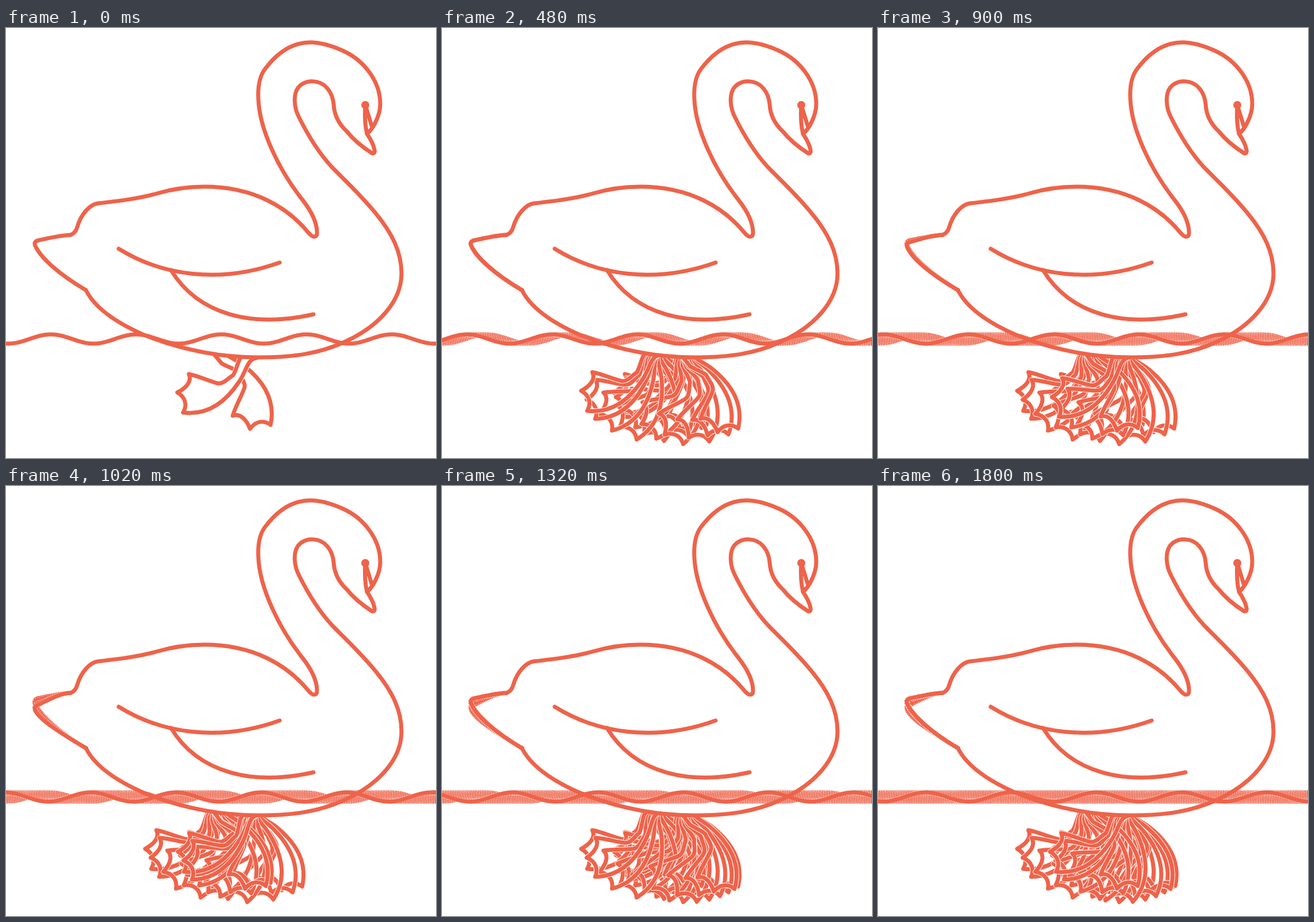
An HTML page with a canvas that plays this animation: 748x748 px, repeating every 1.86 s.

```html
<!DOCTYPE html>
<html lang="en">
<head>
<meta charset="utf-8">
<title>Swan</title>
<style>
  html, body { margin: 0; width: 100%; height: 100%; overflow: hidden; background: #fff; }
  canvas, svg { position: absolute; left: 0; top: 0; width: 748px; height: 748px; }
  .line { fill: none; stroke: #ee634a; stroke-width: 7; stroke-linecap: round; stroke-linejoin: round; }
</style>
</head>
<body>
<canvas id="trail" width="748" height="748"></canvas>
<svg viewBox="0 0 748 748">
  <g class="line">
    <path d="M139 456 C152 482 184 509 238 533 C290 554 360 573 440 573
      C500 573 545 566 587 547 C650 519 688 474 688 427 C688 390 672 357 642 321
      C612 285 590 266 566 241 C545 218 525 186 510 156 C500 137 500 115 508 104
      C522 87 548 91 559 105 C566 113 569 122 570 133 C571 152 580 168 593 180
      C604 194 620 207 637 218 C640 219 642 217 641 212 C639 201 634 193 628 184
      C638 176 651 153 651 132 C651 92 622 56 587 40 C563 29 545 25 529 25
      C500 25 473 41 450 72 C440 86 438 106 439 124 C441 176 474 246 515 298
      C530 317 541 338 541 356 Q541 363 536 363 Q532 363 526 356
      C490 312 431 276 345 276 C313 276 286 281 262 288 C230 297 195 301 160 305
      C145 307 130 325 124 346 Q121 357 112 360"/>
    <path d="M196 384 C270 430 370 446 476 408"/>
    <path d="M287 421 C335 500 430 522 535 498"/>
    <path d="M625 134 Q623 165 628 184 M625 134 L636 170"/>
  </g>
  <circle cx="625" cy="134" r="7" fill="#ee634a"/>
</svg>
<script>
const SIZE = 748, TICK = 60, LOOP = 1860, INK = '#ee634a', WIDTH = 7;
const WAVE = 148.25, SWING = 85 * Math.PI / 180, STROKE_TICKS = 15;
const DOTTED = [1.2, 1.8];

const trail = document.getElementById('trail').getContext('2d');
const layer = document.createElement('canvas');
layer.width = layer.height = SIZE;
const legs = layer.getContext('2d');

// Coordinates are relative to the hip.
const leg = new Path2D(`M2 -15 L-20 7 C-26 20 -27 29 -32 36 C-42 42 -49 52 -59 50
  C-75 46 -90 38 -109 34 C-103 46 -113 58 -129 66 C-115 74 -111 88 -119 101
  C-70 107 -40 75 -22 48 C-8 28 -8 8 9 6 L14 -8`);
const underBody = new Path2D('M0 552 H295 Q355 571 440 573 Q520 573 587 547 H748 V748 H0 Z');

// Each line carries a thin pale rim that cuts into the older trails.
function draw(ctx, path, rim = []) {
  ctx.lineJoin = 'round';
  ctx.lineCap = rim.length ? 'butt' : 'round';
  ctx.lineWidth = WIDTH + 1.8;
  ctx.strokeStyle = '#fff';
  ctx.setLineDash(rim);
  ctx.stroke(path);
  ctx.setLineDash([]);
  ctx.lineCap = 'round';
  ctx.lineWidth = WIDTH;
  ctx.strokeStyle = INK;
  ctx.stroke(path);
}

function wave(step) {
  const path = new Path2D();
  for (let x = -12; x <= SIZE + 12; x += 3) {
    path.lineTo(x, 541 - 8 * Math.cos((x - 78 + step * WAVE / 30) * 2 * Math.PI / WAVE));
  }
  return path;
}

// The tail dips once, between steps 13 and 19.
function tail(step) {
  const t = Math.min(1, Math.max(0, (step - 13) / 6));
  const d = 12 * Math.sin(Math.PI * t) ** 2;
  return new Path2D(`M112 360 C92 361 72 ${366 + d * 0.6} 58 ${369 + d * 0.9}
    Q47 ${371 + d} 51 ${379 + d} C60 ${399 + d * 0.7} 90 427 139 456`);
}

function drawLeg(x, y, tick, inFront) {
  legs.save();
  legs.translate(x, y);
  legs.rotate(-SWING * (1 - Math.cos(2 * Math.PI * tick / STROKE_TICKS)) / 2);
  if (inFront) {
    legs.globalCompositeOperation = 'destination-out';
    legs.fill(leg);
    legs.globalCompositeOperation = 'source-over';
  }
  draw(legs, leg);
  legs.restore();
}

function drawStep(step) {
  // The front leg starts its second stroke half a tick early.
  const lead = step < STROKE_TICKS ? 0 : 0.5;
  draw(trail, wave(step), DOTTED);
  draw(trail, tail(step), DOTTED);
  legs.clearRect(0, 0, SIZE, SIZE);
  legs.save();
  legs.clip(underBody);
  drawLeg(370, 563, step + STROKE_TICKS / 2, false);
  drawLeg(427, 568, step + lead, true);
  legs.restore();
  trail.drawImage(layer, 0, 0);
}

let last = -1;
const start = performance.now();

function frame() {
  const time = Math.max(0, performance.now() - start) % LOOP;
  const step = Math.max(0, Math.floor(time / TICK) - 1);
  if (step < last) last = -1;
  if (last < 0) {
    trail.fillStyle = '#fff';
    trail.fillRect(0, 0, SIZE, SIZE);
  }
  while (last < step) drawStep(++last);
  requestAnimationFrame(frame);
}
frame();
</script>
</body>
</html>
```
